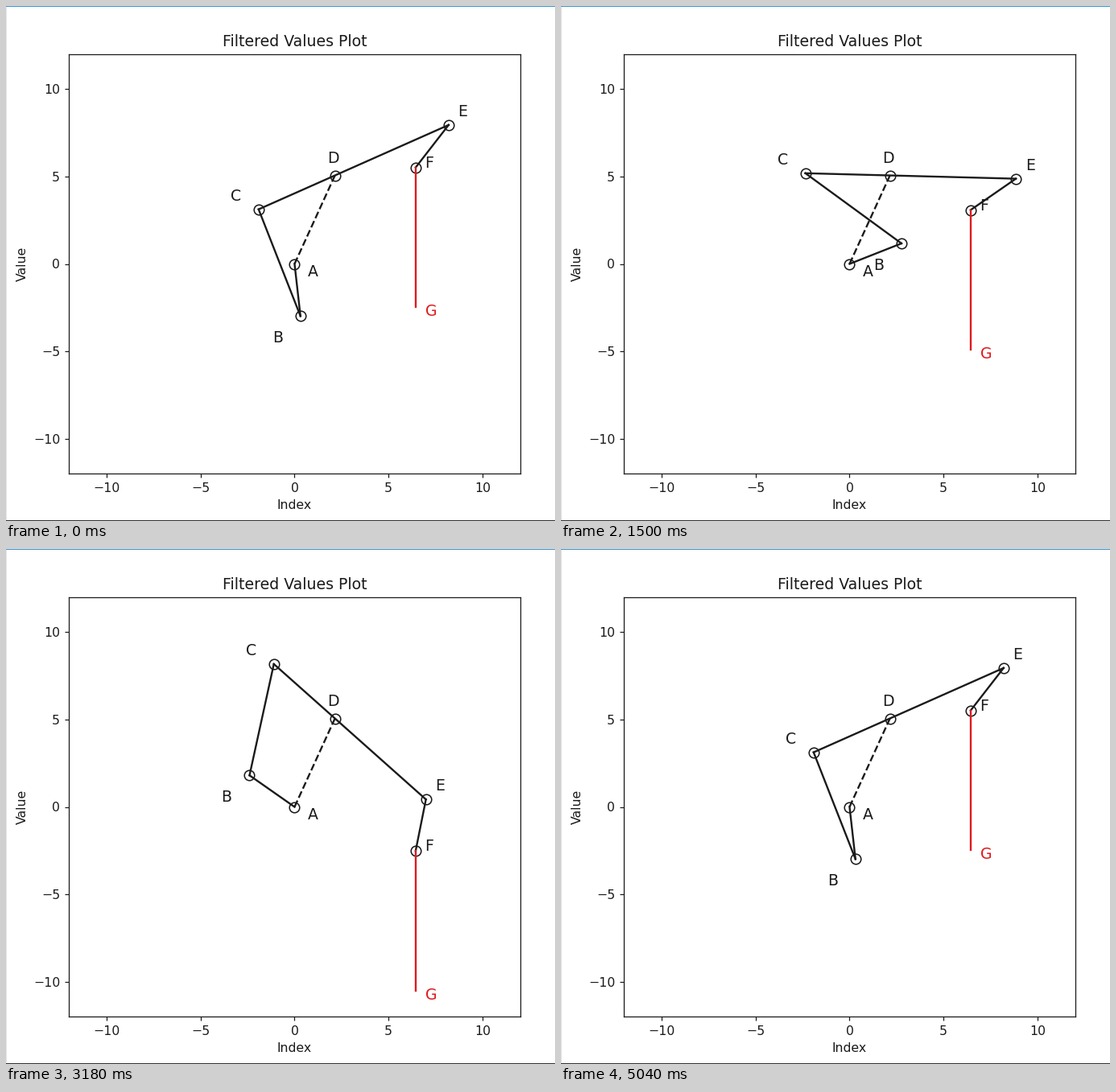
These frames come from a looping animation (682 px wide and 640 px high, 5.1 s). A matplotlib script:

```python
import numpy as np
import matplotlib.pyplot as plt
from matplotlib.animation import FuncAnimation
from matplotlib.patches import Rectangle

W, H, DPI = 682, 640, 113
FRAMES, INTERVAL = 85, 60
INK, RED = "#1a1a1a", "#de1a1e"

# Linkage dimensions
CRANK, COUPLER, REAR, FRONT, LINK, ROD = 3, 6.5, 4.5, 6.7, 3, 8
A = np.zeros(2)
D = 5.5 * np.array([np.cos(np.radians(67)), np.sin(np.radians(67))])
SLIDE_X = 6.44

# Crank travel in degrees; the speed wavers slightly
TRAVEL = ([0, 9, 25, 42, 53, 67, 84], [0, 38, 107, 180, 227, 288, 360])

OFFSETS = {
    "A": (0.7, -0.7), "B": (-1.5, -1.5), "C": (-1.5, 0.5),
    "D": (-0.4, 0.7), "E": (0.5, 0.5), "F": (0.5, 0), "G": (0.5, -0.5),
}


def pose(i):
    """Joint positions of the linkage at step i."""
    t = np.radians(np.interp(i, *TRAVEL) - 84)
    b = CRANK * np.array([np.cos(t), np.sin(t)])
    span = D - b
    dist = np.hypot(*span)
    u = span / dist
    along = (COUPLER**2 - REAR**2 + dist**2) / (2 * dist)
    side = np.sqrt(COUPLER**2 - along**2)
    c = b + along * u + side * np.array([-u[1], u[0]])
    e = D + (D - c) * FRONT / REAR
    f = np.array([SLIDE_X, e[1] - np.sqrt(LINK**2 - (e[0] - SLIDE_X)**2)])
    return {"A": A, "B": b, "C": c, "D": D, "E": e, "F": f,
            "G": f - np.array([0, ROD])}


plt.rcParams.update({
    "font.family": "DejaVu Sans", "text.color": INK, "axes.labelcolor": INK,
    "axes.edgecolor": INK, "xtick.color": INK, "ytick.color": INK,
})
fig = plt.figure(figsize=(W / DPI, H / DPI), dpi=DPI, facecolor="white")
ax = fig.add_axes([78.2 / W, 58.9 / H, 560.5 / W, 521.2 / H])
ax.set(xlim=(-12, 12), ylim=(-12, 12), title="Filtered Values Plot",
       xlabel="Index", ylabel="Value")
ax.set_xticks(range(-10, 11, 5))
ax.set_yticks(range(-10, 11, 5))


def strip(x, y, w, h, color):
    fig.add_artist(Rectangle((x / W, y / H), w / W, h / H, fc=color, lw=0))


strip(0, 0, 1, H, "#e4e4e4")
strip(0, H - 1, W, 1, "#3c96d2")
strip(0, 0, W, 1, "#303030")

bars = {}
for ends in ("AB", "BC", "CE", "EF", "AD", "FG"):
    bars[ends], = ax.plot([], [], "--" if ends == "AD" else "-", lw=1.5,
                          color=RED if ends == "FG" else INK)
joints, = ax.plot([], [], "o", ms=8, mfc="none", mec=INK, mew=1, zorder=1.9)
labels = {k: ax.text(0, 0, k, fontsize=12, color=RED if k == "G" else INK)
          for k in OFFSETS}


def update(i):
    p = pose(i)
    for ends, bar in bars.items():
        bar.set_data(*np.array([p[k] for k in ends]).T)
    joints.set_data(*np.array([p[k] for k in "ABCDEF"]).T)
    for k, label in labels.items():
        label.set_position(p[k] + np.array(OFFSETS[k]))
    return [*bars.values(), joints, *labels.values()]


anim = FuncAnimation(fig, update, frames=FRAMES, interval=INTERVAL,
                     repeat=True, repeat_delay=0)
plt.show()
```
